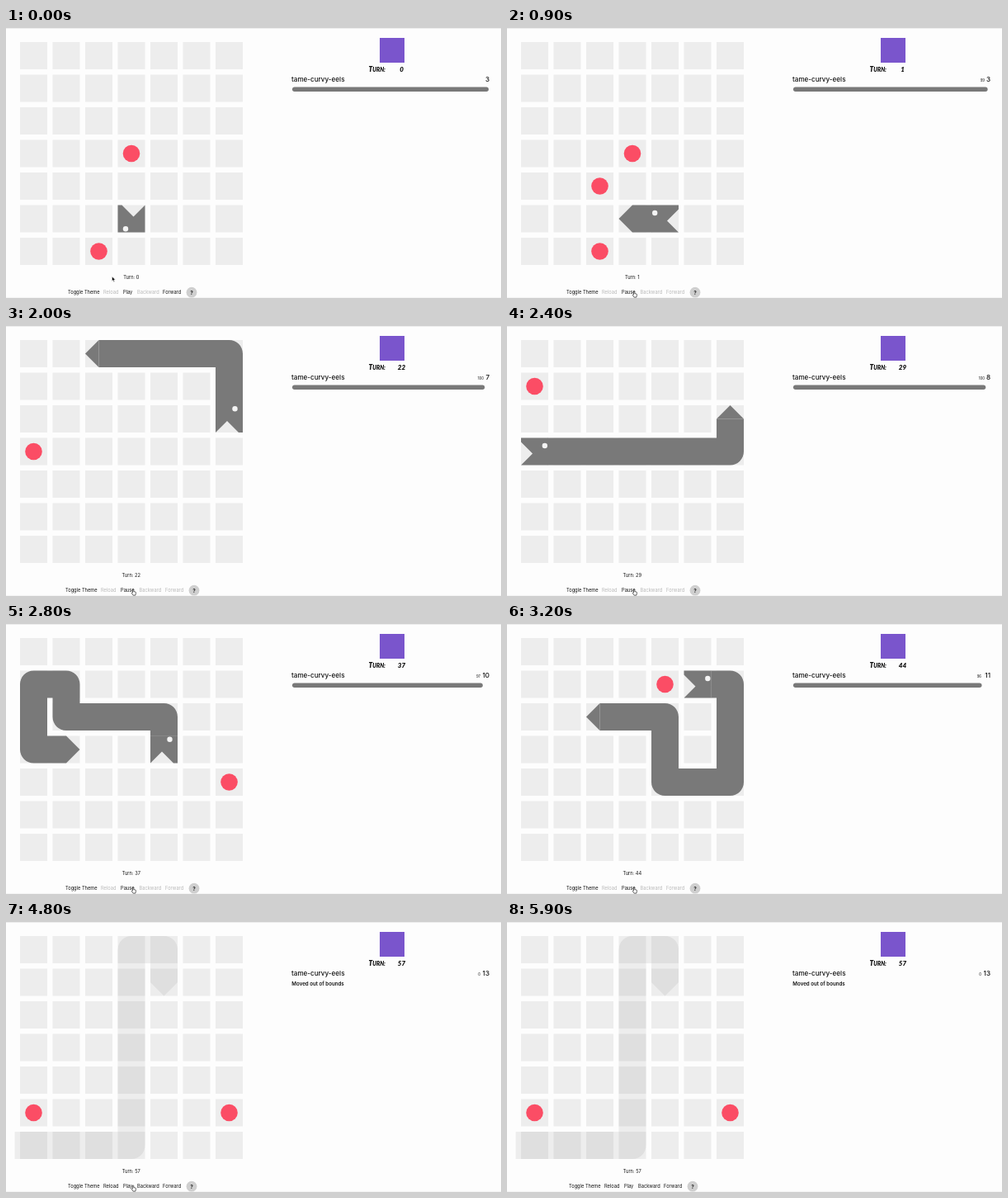
An HTML page for the animation above (6200 ms loop, 600 px wide and 327 px high).

```html
<!DOCTYPE html>
<html lang="en">
<head>
<meta charset="utf-8">
<title>Grid game replay</title>
<style>
  html, body { margin: 0; width: 100%; height: 100%; overflow: hidden; background: #fdfdfd; }
  svg { display: block; width: 100%; height: 100%; }
  text { font-family: Inter, "Liberation Sans", sans-serif; font-size: 5.7px; fill: #111; }
  .mid { text-anchor: middle; }
  .end { text-anchor: end; }
  .big { font-size: 8.1px; font-weight: 500; }
  .hand { font-family: Lato, sans-serif; font-weight: 900; font-style: italic; }
</style>
</head>
<body>
<svg viewBox="0 0 600 327">
  <defs><clipPath id="view"><rect x="10.5" y="10.5" width="283" height="283"/></clipPath></defs>
  <rect width="600" height="327" fill="#fdfdfd"/>
  <rect width="600" height="1" fill="#ececec"/>
  <rect y="326" width="600" height="1" fill="#f4f4f4"/>
  <g id="cells" fill="#ededed"></g>
  <g id="foods" fill="#fb4d65"></g>
  <g clip-path="url(#view)">
    <g id="snake" fill="#797979">
      <path id="body" fill="none" stroke="#797979" stroke-width="33" stroke-linejoin="round"/>
      <path id="tail"/>
      <g id="head">
        <path d="M-16.5-16.5H16.5V-11.5L2.5 2.5L16.5 16.5H-16.5Z"/>
        <circle cx="-12.3" cy="-7" r="3.2" fill="#f4f4f4"/>
      </g>
    </g>
  </g>

  <rect x="453" y="12" width="30" height="30" fill="#7a55cc"/>
  <text class="hand" x="439.5" y="52.5" font-size="8"><tspan style="font-size:8.4px">T</tspan><tspan style="font-size:6.8px">URN:</tspan></text>
  <text id="topTurn" class="hand mid" x="479.5" y="52.5" style="font-size:8px"></text>
  <text class="big" x="346" y="65">tame-curvy-eels</text>
  <text id="health" class="end" y="65" style="font-size:4.3px"></text>
  <text id="size" class="big end" x="586" y="65"></text>
  <rect id="bar" x="347" y="71.5" height="5.5" rx="2.7" fill="#797979"/>
  <text id="death" x="346.3" y="76.5" style="font-size:6.2px;font-weight:600">Moved out of bounds</text>

  <text id="turn" class="mid" x="151.8" y="304"></text>
  <g id="buttons"></g>
  <circle id="helpDot" cy="320.2" r="6.4" fill="#cfcfcf"/>
  <text id="help" class="mid" y="322.6" style="font-size:6.5px;font-weight:600">?</text>
  <g id="cursor" stroke="#fff" stroke-width=".5" stroke-linejoin="round">
    <path id="arrow" d="M0 0V5.6L1.3 4.4L2.2 6.4L3.1 6L2.2 4.1H4Z" fill="#000"/>
    <path id="finger" d="M0-2.2Q.7-3 1.3-2.2V0L3.5.6Q4.2.9 4 2L3.3 4.6H.6L-1.2 2Q-1.2 1 0 1.5Z" fill="#fff" stroke="#222" stroke-width=".7"/>
  </g>
</svg>
<script>
const LOOP = 6200, FRAME = 100, TURN_MS = 53.3, LAST = 57;
const $ = id => document.getElementById(id);
const mid = i => 33.5 + 39.5 * i;
const clamp = (v, a, b) => Math.max(a, Math.min(b, v));
const ease = p => p * p * (3 - 2 * p);

function make(parent, tag, attrs) {
  const el = document.createElementNS("http://www.w3.org/2000/svg", tag);
  set(el, attrs);
  return parent.appendChild(el);
}
function set(el, attrs) {
  for (const k in attrs) el.setAttribute(k, attrs[k]);
}
function show(el, on) {
  el.style.display = on ? "" : "none";
}

// One letter per turn
const moves = "RULLURDDDLUUUUUURRRRDDDLLLLLLUURDRRRDDRRUUULLULDDDDDDLLLL";
const dirs = { R: [1, 0], L: [-1, 0], U: [0, -1], D: [0, 1] };
const poses = { R: "", L: "scale(-1 1)", U: "rotate(-90)", D: "rotate(90)" };
const trail = [[3, 5]];
for (const m of moves) {
  const [x, y] = trail[trail.length - 1];
  trail.push([x + dirs[m][0], y + dirs[m][1]]);
}

// column, row, turn it appears, turn it is eaten
const foods = [
  [3, 3, 0, 6], [2, 6, 0, 10], [2, 4, 1, 4], [6, 2, 12, 22], [0, 3, 18, 29], [0, 1, 26, 31],
  [2, 2, 30, 34], [6, 4, 35, 40], [4, 1, 39, 45], [2, 6, 46, 54], [6, 5, 48, 99], [0, 5, 55, 99]
];

for (let i = 0; i < 49; i++)
  make($("cells"), "rect", { x: mid(i % 7) - 16.5, y: mid(Math.floor(i / 7)) - 16.5, width: 33, height: 33 });
const dots = foods.map(([c, r]) => make($("foods"), "circle", { cx: mid(c), cy: mid(r), r: 10.3 }));
const labels = ["Toggle Theme", "Reload", "Play", "Backward", "Forward"].map(name => {
  const el = make($("buttons"), "text", { y: 322.3 });
  el.textContent = name;
  return el;
});

function drawSnake(turn, size) {
  const pts = trail.slice(Math.max(0, turn - size + 1), turn + 1).map(([c, r]) => [mid(c), mid(r)]);
  const way = turn ? moves[turn - 1] : "U";
  const [dx, dy] = dirs[way];
  const [hx, hy] = pts[pts.length - 1];
  set($("head"), { transform: `translate(${hx} ${hy}) ${poses[way]}` });
  const long = pts.length > 1;
  show($("body"), long);
  show($("tail"), long);
  if (long) {
    const [[tx, ty], [nx, ny]] = pts;
    const ux = Math.sign(tx - nx) * 16.5, uy = Math.sign(ty - ny) * 16.5;
    set($("tail"), { d: `M${tx - uy} ${ty + ux}L${tx + ux} ${ty + uy}L${tx + uy} ${ty - ux}Z` });
    pts[pts.length - 1] = [hx - dx * 16.3, hy - dy * 16.3];
    set($("body"), { d: "M" + pts.join("L") });
  }
  set($("snake"), { opacity: turn === LAST ? 0.12 : 1 });
}

function drawPanel(turn, size, lastMeal) {
  const dead = turn === LAST;
  const health = dead ? 0 : 100 - turn + lastMeal;
  const fill = turn && turn === lastMeal ? 98 : health;
  $("topTurn").textContent = turn;
  $("turn").textContent = "Turn: " + turn;
  $("size").textContent = size;
  $("health").textContent = turn ? health : "";
  set($("health"), { x: size > 9 ? 575 : 579 });
  set($("bar"), { width: 2.38 * fill });
  show($("bar"), !dead);
  show($("death"), dead);
}

function drawButtons(t) {
  const playing = t >= 800 && t < 4000, done = t >= 4000;
  const xs = playing ? [72, 115, 139, 161.5, 193] : [75, 118, 142, 159, 190];
  labels.forEach((el, i) => {
    const on = done || i === 0 || i === 2 || (i === 4 && !playing);
    el.setAttribute("x", xs[i]);
    el.style.fill = on ? "#111" : "#b8b8b8";
  });
  labels[2].textContent = playing ? "Pause" : "Play";
  const x = playing ? 228 : 225;
  set($("helpDot"), { cx: x });
  set($("help"), { x });
}

function drawCursor(t) {
  const come = ease(clamp(t / 700, 0, 1));
  const go = ease(clamp((t - 4800) / 500, 0, 1));
  const x = 128.5 + 25 * come + 331 * go, y = 301 + 20.5 * come - 302 * go;
  const pointing = t >= 600 && t <= 4800;
  set($("cursor"), { transform: `translate(${x} ${y})` });
  show($("cursor"), t < 5300);
  show($("arrow"), !pointing);
  show($("finger"), pointing);
}

function draw(ms) {
  const t = Math.floor((ms % LOOP) / FRAME) * FRAME;
  const turn = clamp(Math.floor((t - 815) / TURN_MS), 0, LAST);
  const meals = foods.map(f => f[3]).filter(n => n <= turn);
  const size = 3 + meals.length;
  foods.forEach(([, , from, to], i) => show(dots[i], turn >= from && turn < to));
  drawSnake(turn, size);
  drawPanel(turn, size, Math.max(0, ...meals));
  drawButtons(t);
  drawCursor(t);
}

const start = performance.now();
function tick() {
  draw(performance.now() - start);
  requestAnimationFrame(tick);
}
tick();
</script>
</body>
</html>
```
